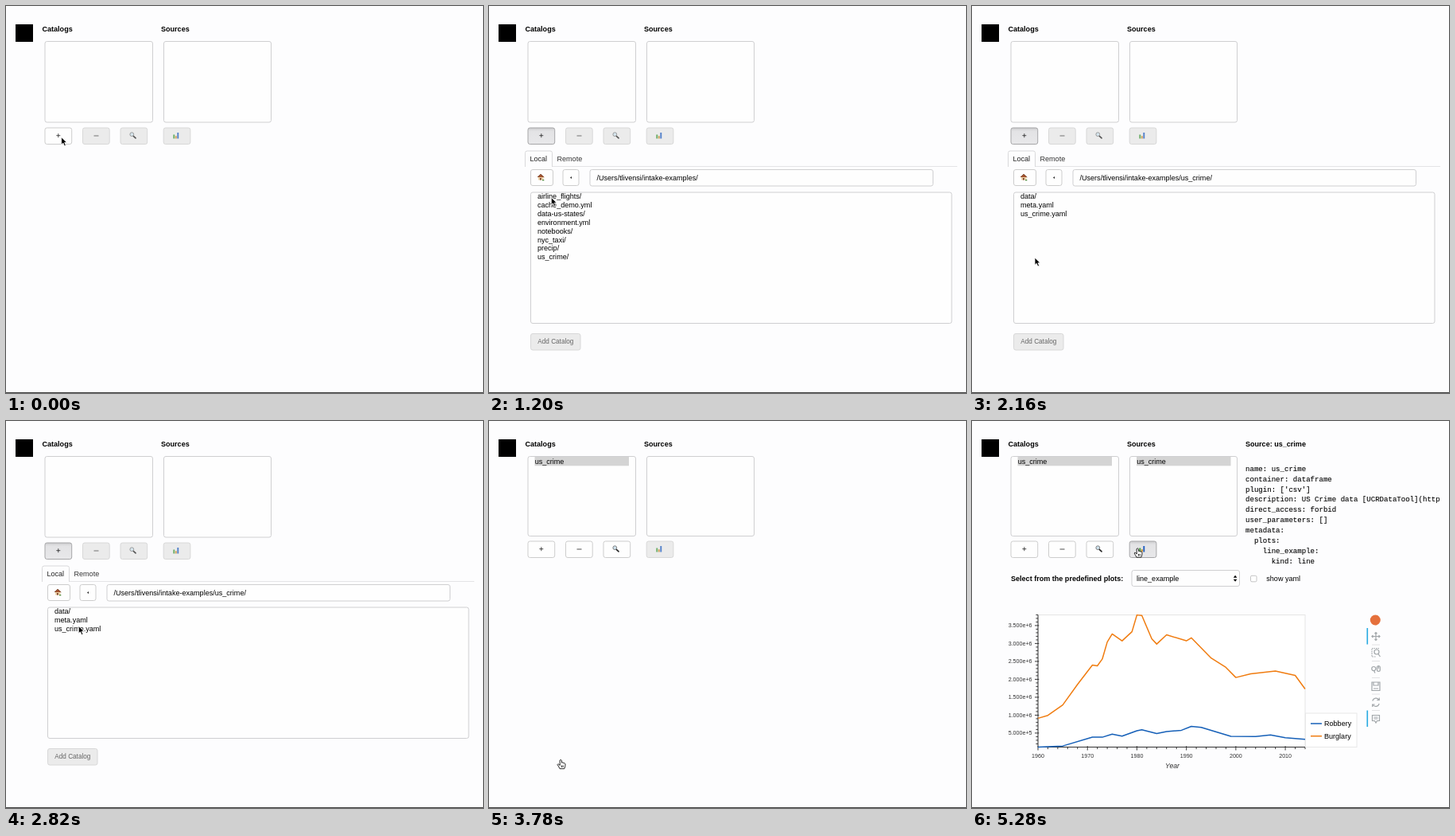
These frames come from a looping animation (600x486 px, 5.34 s). An HTML page:

```html
<!DOCTYPE html>
<html lang="en">
<head>
<meta charset="utf-8">
<title>Catalog browser</title>
<style>
html, body { margin: 0; width: 100%; height: 100%; overflow: hidden; background: #fdfdfe; }
svg { display: block; width: 600px; height: 486px; }
text { font: 9.05px "Liberation Sans", Arial, sans-serif; white-space: pre; }
.bold { font-weight: bold; }
.mono { font: 9.07px "Liberation Mono", "Courier New", monospace; stroke: #000; stroke-width: .1; }
.small { font-size: 8.2px; }
.tick { font-size: 7.1px; fill: #333; }
.axis { font-size: 8.7px; font-style: italic; fill: #333; }
.box { fill: #fefefe; stroke: #cfcfd1; }
.line { fill: none; stroke-width: 1.5; stroke-linejoin: round; }
.burglary { stroke: #f07c10; }
.robbery { stroke: #1660b8; }
.short { height: 100px; }
.up { transform: translateY(-2px); }
.hide { display: none; }
.off rect { fill: #ebebeb; stroke: #d8d8d8; }
.off text { fill: #666; }
.off .icon { opacity: .75; }
.on rect { fill: #fefefe; stroke: #cdcdcd; }
.hover rect { fill: #f0f0f0; stroke: #b4b4b4; }
.down rect { fill: url(#press); stroke: #a6a6a8; }
.focus { fill: none; stroke: #66afe9; filter: drop-shadow(0 0 1.8px #66afe9); }
.pick { fill: #0a5bd8; }
.chosen { fill: #d4d4d4; }
.tools { fill: none; stroke: #a1a6a9; stroke-width: 1.2; }
</style>
</head>
<body>
<svg viewBox="0 0 600 486">
  <defs>
    <linearGradient id="press" x2="0" y2="1">
      <stop stop-color="#cbcbcd"/><stop offset=".2" stop-color="#e3e3e5"/><stop offset="1" stop-color="#e8e8ea"/>
    </linearGradient>
  </defs>
  <path d="M0 485.5H600" stroke="#444"/>
  <rect x="12" y="23" width="22" height="22"/>
  <text class="bold" x="45.5" y="32">Catalogs</text>
  <text class="bold" x="195" y="32">Sources</text>
  <g class="box">
    <rect id="catBox" x="49" y="44.5" width="135.5" height="101.5" rx="2.5"/>
    <rect id="srcBox" x="198.5" y="44.5" width="135" height="101.5" rx="2.5"/>
  </g>
  <g id="catItem"><rect class="chosen" x="57.5" y="45" width="118.5" height="11.3"/><text x="57.7" y="53.5">us_crime</text></g>
  <g id="srcItem"><rect class="chosen" x="207" y="45" width="118.5" height="11.3"/><text x="207.2" y="53.5">us_crime</text></g>

  <g id="row">
    <g id="plus"><rect x="49" y="153" width="33.7" height="20.5" rx="2.5"/>
      <path d="M63.3 162.7h5M65.8 160.2v5" stroke="#222" stroke-width=".8"/></g>
    <g id="minus"><rect x="96.5" y="153" width="33.7" height="20.5" rx="2.5"/>
      <path class="icon" d="M110.5 163h6" stroke="#222" stroke-width=".8"/></g>
    <g id="find"><rect x="144" y="153" width="33.7" height="20.5" rx="2.5"/>
      <g class="icon">
        <path d="M160 163.2l3 2.7" stroke="#222" stroke-width="1.6" stroke-linecap="round"/>
        <circle cx="158.3" cy="161.2" r="2.4" fill="#cfe3ee" stroke="#777" stroke-width=".9"/>
      </g></g>
    <g id="chart"><rect x="198.2" y="153" width="33.7" height="20.5" rx="2.5"/>
      <g class="icon" stroke-width="1.9">
        <path d="M211.3 166.5v-5" stroke="#3f9a3c"/>
        <path d="M213.8 166.5v-3.3" stroke="#c98a2c"/>
        <path d="M216.3 166.5v-7.5" stroke="#1f5cc0"/>
      </g></g>
  </g>

  <g id="panel">
    <path d="M45 201.5H589" stroke="#e4e4e6"/>
    <path d="M45.5 202V184.5q0-2.5 2.5-2.5H77q2.5 0 2.5 2.5V202" fill="#fdfdfe" stroke="#d9d9db"/>
    <path d="M46 201.5H79" stroke="#fdfdfe"/>
    <text x="51.5" y="194.7" fill="#222">Local</text>
    <text x="85.5" y="194.7" fill="#333">Remote</text>
    <g id="home"><rect x="52.5" y="205.5" width="28" height="20" rx="2.5"/>
      <path d="M62 214.5h6.5v4H62z" fill="#e9cfa6"/>
      <path d="M61 215l4-3.8 4.3 3.8" fill="#a4532e" stroke="#6e3a22" stroke-width=".8"/>
      <path d="M64 218.5V216h1.7v2.5z" fill="#7a3f26"/>
      <path d="M67 218.7h2.3" stroke="#4c8c3c" stroke-width="1.3"/></g>
    <g class="on"><rect x="93" y="205.5" width="20" height="20" rx="2.5"/><path d="M104 214v3l-2-1.500z" fill="#222"/></g>
    <rect class="box" x="127" y="205.5" width="431.5" height="20.5" rx="2.5"/>
    <text x="135.5" y="218.5">/Users/tlivensi/intake-examples/<tspan id="subdir">us_crime/</tspan></text>
    <rect class="box" x="52.5" y="234" width="529.5" height="164.5" rx="2.5"/>
    <g id="dir1"></g>
    <g id="dir2"></g>
    <g id="pick1"></g>
    <g id="pick2"></g>
    <g id="add"><rect x="52.5" y="411.5" width="62.5" height="20.5" rx="2.5"/><text class="small" x="61.3" y="424.4">Add Catalog</text></g>
  </g>

  <g id="info"><text class="bold" x="344" y="32">Source: us_crime</text></g>

  <g id="choice">
    <text class="bold" x="49" y="200.5">Select from the predefined plots:</text>
    <rect class="box" x="201" y="187.5" width="135.5" height="20" rx="2.5"/>
    <text x="207" y="200.5">line_example</text>
    <path d="M328.8 196.7h4.6l-2.3-3zM328.8 198.7h4.6l-2.3 3z"/>
    <rect x="350.5" y="194.3" width="7.5" height="7.5" rx="1.5" fill="#fff" stroke="#b5b5b7" stroke-width=".8"/>
    <text x="370.3" y="200.5">show yaml</text>
  </g>

  <g id="plot">
    <rect x="83" y="243.5" width="336" height="166" fill="#fff" stroke="#e5e5e5"/>
    <path id="axes" fill="none" stroke="#222" stroke-width=".9"/>
    <path id="burglary" class="line burglary"/>
    <path id="robbery" class="line robbery"/>
    <text class="axis" x="252" y="435.5" text-anchor="middle">Year</text>
    <rect x="419.5" y="367" width="64.5" height="42.5" fill="#fff" stroke="#e8e8e8"/>
    <path class="line robbery" d="M426 380h14"/><text x="443" y="383.2">Robbery</text>
    <path class="line burglary" d="M426 395.7h14"/><text x="443" y="398.9">Burglary</text>
  </g>

  <g id="toolbar">
    <circle cx="507.3" cy="250" r="6.5" fill="#e5703c"/>
    <path d="M497.3 260v20.5M497.3 363.5v20.5" stroke="#26aae1" stroke-width="1.6"/>
    <path d="M503 281h10M503 301.5h10M503 322.5h10M503 343h10M503 363.5h10" stroke="#e2e2e4"/>
    <g class="tools">
      <path d="M503 270.5h10M508 265.500v10M504.500 269l-1.500 1.500 1.500 1.500M511.500 269l1.500 1.500-1.500 1.500M506.500 267l1.500-1.500 1.500 1.500M506.500 274l1.500 1.500 1.500-1.500"/>
      <path d="M512 285.5h-9V296h5" stroke-dasharray="1.5 1"/><circle cx="509" cy="290" r="3"/><path d="M511 292.5l2.5 3.5"/>
      <circle cx="505.3" cy="311" r="2.5"/><path d="M505.5 313.5l1.5 3M511.4 308v3"/><rect x="509.5" y="307.5" width="3.8" height="7" rx="1.9"/>
      <path d="M503 328h10v10.5h-10zM505 328v4h6v-4M505 336h6"/>
      <path d="M503.8 351.5a4.5 4.5 0 0 1 8-1.5M512.2 355a4.5 4.5 0 0 1-8 1.5M512.3 347.5v3h-3M503.7 359v-3h3"/>
      <path d="M503.5 369.5h9v7h-3L508 379l-1.500-2.500h-3zM505.500 372h5M505.500 374h5"/>
    </g>
  </g>

  <g id="cursor">
    <path id="arrow" d="M0 .5V9.800L2.200 7.800 3.800 11.500 5.600 10.700 4 7.200H6.900Z" stroke="#fff" stroke-width=".8"/>
    <path id="hand" d="M-1.200.3Q0-1.200 1 .3L1.300 3.400 2.300 3.100 3.600 3.600 4.800 3.900 5.700 5 5.500 7.700 4.500 10.900H-1.300L-2.700 8.200-4.200 5.700Q-3.800 4.400-2.400 5.400L-1 6.700ZM1.200 6.700V9.100M2.900 6.700V9.100" fill="#fff" stroke="#111" stroke-width=".9" stroke-linejoin="round"/>
  </g>
</svg>
<script>
const LOOP = 5340, STEP = 60;
const $ = id => document.getElementById(id);

function add(parent, tag, attrs, content = '') {
  const el = document.createElementNS('http://www.w3.org/2000/svg', tag);
  for (const k in attrs) el.setAttribute(k, attrs[k]);
  el.textContent = content;
  parent.append(el);
}

// File lists
const rowY = i => 242.2 + 10.86 * i;
const files = ['airline_flights/', 'cache_demo.yml', 'data-us-states/', 'environment.yml',
  'notebooks/', 'nyc_taxi/', 'precip/', 'us_crime/'];
const crimeFiles = ['data/', 'meta.yaml', 'us_crime.yaml'];

function list(id, names) {
  names.forEach((name, i) => add($(id), 'text', { x: 61, y: rowY(i) }, name));
}
function selectLast(id, names) {
  const y = rowY(names.length - 1);
  add($(id), 'rect', { class: 'focus', x: 52.5, y: 234, width: 529.5, height: 164.5, rx: 2.5 });
  add($(id), 'rect', { class: 'pick', x: 61, y: y - 8, width: 513, height: 10.8 });
  add($(id), 'text', { x: 61, y, fill: '#fff' }, names.at(-1));
}
list('dir1', files);
list('dir2', crimeFiles);
selectLast('pick1', files);
selectLast('pick2', crimeFiles);

const yaml = `name: us_crime
container: dataframe
plugin: ['csv']
description: US Crime data [UCRDataTool](http
direct_access: forbid
user_parameters: []
metadata:
  plots:
    line_example:
      kind: line`;
yaml.split('\n').forEach((line, i) => add($('info'), 'text', { class: 'mono', x: 344, y: 62.8 + 12.87 * i }, line));

// Plot: turning points as years since 1960 and thousands of cases
const px = year => 83 + 6.222 * year;
const py = cases => 414.4 - .045 * cases;
const curve = points => 'M' + points.map(([year, cases]) => `${px(year)} ${py(cases)}`).join('L');

$('burglary').setAttribute('d', curve([[0, 912], [2, 994], [5, 1283], [8, 1859], [11, 2399], [12, 2376],
  [13, 2566], [14, 3039], [15, 3265], [17, 3072], [19, 3328], [20, 3795], [21, 3780], [23, 3130], [24, 2984],
  [26, 3241], [30, 3074], [31, 3157], [35, 2594], [38, 2333], [40, 2051], [43, 2155], [48, 2229],
  [52, 2110], [54, 1730]]));
$('robbery').setAttribute('d', curve([[0, 108], [5, 139], [11, 388], [13, 384], [15, 471], [17, 413],
  [20, 566], [21, 593], [24, 485], [26, 543], [29, 578], [31, 688], [33, 660], [39, 409],
  [44, 401], [47, 447], [50, 369], [54, 326]]));

let axes = 'M83 243.5V409.5H419';
for (let k = 200; k <= 3800; k += 100) {
  const major = k % 500 === 0;
  axes += `M${major ? 79 : 80.4} ${py(k)}H${major ? 84.3 : 83}`;
  if (major) {
    const label = (k * 1000).toExponential(3);
    add($('plot'), 'text', { class: 'tick', x: 75.5, y: py(k) + 2.5, 'text-anchor': 'end' }, label);
  }
}
for (let year = 0; year <= 54; year += 2) {
  const major = year % 10 === 0;
  axes += `M${px(year)} ${major ? 408.2 : 409.5}V${major ? 413.5 : 412.1}`;
  if (major) add($('plot'), 'text', { class: 'tick', x: px(year), y: 422.6, 'text-anchor': 'middle' }, 1960 + year);
}
$('axes').setAttribute('d', axes);

// Moments of the story
const T = {
  addPanel: 120, panel: 300, files: 420, leave: 1020, openDir: 2040, newPath: 2100, newFiles: 2160,
  pickFile: 3000, overAdd: 3420, pressAdd: 3600, catalog: 3720, source: 3840,
  overChart: 4680, pressChart: 4740, choice: 5160, plot: 5220, toolbar: 5280
};

// Class of each part: a first value, then [time, class] changes
const show = (from, to = LOOP) => ['hide', [from, ''], [to, 'hide']];
const enabled = ['off', [T.catalog, 'on']];
const shorter = ['', [T.catalog, 'short']];
const tracks = {
  plus: ['on', [T.addPanel, 'down'], [T.catalog, 'on']],
  minus: enabled,
  find: enabled,
  chart: ['off', [T.source, 'on'], [T.overChart, 'hover'], [T.pressChart, 'down']],
  home: ['on', [900, 'hover'], [T.leave, 'on']],
  add: ['off', [T.pickFile, 'on'], [T.overAdd, 'hover'], [T.pressAdd, 'down']],
  row: ['', [T.catalog, 'up']],
  catBox: shorter,
  srcBox: shorter,
  panel: show(T.panel, T.catalog),
  dir1: show(T.files, T.newFiles),
  dir2: show(T.newFiles),
  subdir: show(T.newPath),
  pick1: show(T.openDir, T.newFiles),
  pick2: show(T.pickFile),
  catItem: show(T.catalog),
  srcItem: show(T.source),
  info: show(T.source),
  choice: show(T.choice),
  plot: show(T.plot),
  toolbar: show(T.toolbar)
};
const handTimes = [[T.addPanel, T.leave], [T.overAdd, T.source], [T.overChart, LOOP]];

// Pointer moves: start, end, x, y
const moves = [
  [60, 120, 71.5, 167], [720, 1200, 78.3, 240], [1380, 1800, 79, 315.5],
  [2460, 2820, 91.3, 257], [3180, 3420, 90.3, 425.8], [4140, 4680, 208.3, 160.3]
];

function pointer(t) {
  let x = 69.7, y = 164.3;
  for (const [from, to, x1, y1] of moves) {
    const p = Math.min(1, Math.max(0, (t - from) / (to - from)));
    const eased = Math.sin(p * Math.PI / 2);
    x += (x1 - x) * eased;
    y += (y1 - y) * eased;
  }
  return `translate(${x} ${y})`;
}

function draw(now) {
  const t = Math.floor(now % LOOP / STEP) * STEP;
  for (const id in tracks) {
    const [first, ...changes] = tracks[id];
    const last = changes.findLast(([time]) => time <= t);
    $(id).setAttribute('class', last ? last[1] : first);
  }
  const isHand = handTimes.some(([from, to]) => t >= from && t < to);
  $('arrow').setAttribute('class', isHand ? 'hide' : '');
  $('hand').setAttribute('class', isHand ? '' : 'hide');
  $('cursor').setAttribute('transform', pointer(t));
}

const start = performance.now();
function tick() {
  draw(performance.now() - start);
  requestAnimationFrame(tick);
}
tick();
</script>
</body>
</html>
```
